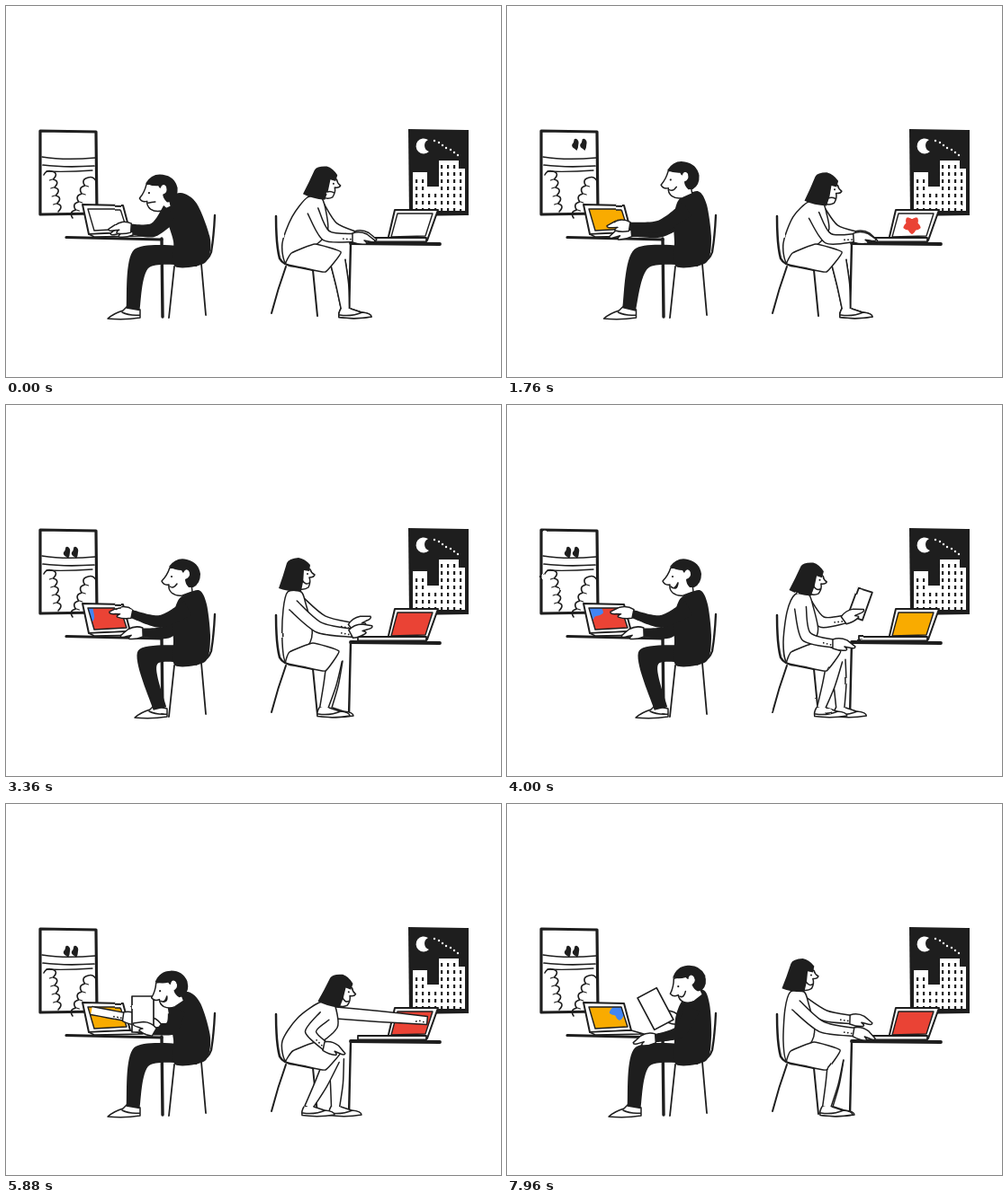
Animation of 550x413 px, one loop 8000 ms. Source, as an HTML page:

```html
<!DOCTYPE html>
<html lang="en">
<head>
<meta charset="utf-8">
<title>Two desks</title>
<style>
html, body { margin: 0; width: 100%; height: 100%; overflow: hidden; background: #fff; }
svg { display: block; width: 100%; height: 100%; }
.l { fill: none; stroke: #1e1e1e; stroke-width: 1.5; stroke-linecap: round; stroke-linejoin: round; }
.w { fill: #fff; stroke: #1e1e1e; stroke-width: 1.5; stroke-linejoin: round; stroke-linecap: round; }
.k { fill: #1e1e1e; }
.p { fill: #fff; }
</style>
</head>
<body>
<svg viewBox="0 0 550 413">
  <defs>
    <filter id="boil" filterUnits="userSpaceOnUse" x="0" y="0" width="550" height="413" color-interpolation-filters="sRGB">
      <feTurbulence id="noise" type="fractalNoise" baseFrequency=".06" numOctaves="1" seed="1"/>
      <feDisplacementMap in="SourceGraphic" scale="1.8" xChannelSelector="R" yChannelSelector="G"/>
    </filter>
    <clipPath id="pane"><path d="M39 140H100V231H39Z"/></clipPath>
    <clipPath id="clipL"><path d="M91 226L127 226L134 248L98 250Z"/></clipPath>
    <clipPath id="clipR"><path d="M435 231L474 231L466 256L428 257Z"/></clipPath>
  </defs>
  <g id="stage" filter="url(#boil)"></g>
</svg>
<script>
const LOOP = 8000;
const YELLOW = '#f9ab00', BLUE = '#4285f4', RED = '#ea4335';
const stage = document.getElementById('stage');
const noise = document.getElementById('noise');

function el(tag, attrs, parent = stage) {
  const e = document.createElementNS('http://www.w3.org/2000/svg', tag);
  for (const k in attrs) e.setAttribute(k, attrs[k]);
  return parent.appendChild(e);
}
function path(cls, d = '', width = 0, parent = stage) {
  const e = el('path', { class: cls, d }, parent);
  if (width) e.style.strokeWidth = width;
  return e;
}
const line = (d, width, parent) => path('l', d, width, parent);
const dot = (cx, cy, r, cls, parent) => el('circle', { cx, cy, r, class: cls }, parent);
const group = (parent = stage, attrs = {}) => el('g', attrs, parent);
const draw = (e, d) => e.setAttribute('d', d);
const show = (e, on) => e.setAttribute('display', on ? 'inline' : 'none');
const place = (e, x, y, r = 0, flip = 1) => e.setAttribute('transform', `translate(${x} ${y}) rotate(${r}) scale(${flip} 1)`);

const ramp = (t, a, b) => Math.max(0, Math.min(1, (t - a) / (b - a)));
const ease = k => k * k * (3 - 2 * k);
const lerp = (a, b, k) => a + (b - a) * k;
const mid = (a, b) => [(a[0] + b[0]) / 2, (a[1] + b[1]) / 2];

// Smooth curve through points.
function curve(p, closed = true, tension = 0.14) {
  const n = p.length;
  const at = i => p[closed ? (i + n) % n : Math.max(0, Math.min(n - 1, i))];
  let d = 'M' + at(0);
  for (let i = 0; i < (closed ? n : n - 1); i++) {
    const [a, b, c, e] = [at(i - 1), at(i), at(i + 1), at(i + 2)];
    d += `C${b.map((v, m) => v + (c[m] - a[m]) * tension)} ${c.map((v, m) => v - (e[m] - b[m]) * tension)} ${c}`;
  }
  return d;
}

// Outline of a tapering limb, left open at its root.
function limb(joints, widths) {
  const left = [], right = [];
  joints.forEach(([x, y], i) => {
    const a = joints[Math.max(0, i - 1)], b = joints[Math.min(joints.length - 1, i + 1)];
    const dx = b[0] - a[0], dy = b[1] - a[1], k = widths[i] / 2 / (Math.hypot(dx, dy) || 1);
    left.push([x - dy * k, y + dx * k]);
    right.unshift([x + dy * k, y - dx * k]);
  });
  return curve(left, false) + curve(right, false).replace('M', 'L');
}

// The middle joint sits off the centre by the bend.
function bent(a, b, bend) {
  const m = mid(a, b), dx = b[0] - a[0], dy = b[1] - a[1], k = bend / Math.hypot(dx, dy);
  return [a, [m[0] - dy * k, m[1] + dx * k], b];
}

function poseAt(keys, t) {
  const i = keys.findLastIndex(p => t >= p.from), a = keys[i], b = keys[i + 1];
  if (!b || t <= a.until) return a;
  const k = ease(ramp(t, a.until, b.from)), out = {};
  for (const key in a) if (Array.isArray(a[key])) out[key] = a[key].map((v, j) => lerp(v, b[key][j], k));
  return out;
}
// Each pose takes over what it does not change from the one before.
const chain = poses => poses.reduce((all, p) => [...all, { ...all.at(-1), ...p }], []);

// Left window
path('w', 'M38 139L100 140L101 231L38 232Z', 3.2);
line('M40 168Q65 172 99 169', 1.5);
line('M41 177Q65 180 98 178', 1.7);
line('M45 184Q68 185 96 183', 1.3);
function bush(x, y, dir, drift) {
  const bump = `q${dir * 8} 2 ${dir * drift} 9`;
  line(`M${x - dir * 9} ${y + 4}q${dir * 3} -6 ${dir * 9} -4${bump.repeat(5)}`, 1.6);
  for (let i = 1; i < 5; i++) line(`M${x + dir * (drift * i - 4)} ${y + 9 * i + 1}l${dir * 3} -1`, 1.2);
}
bush(51, 184, 1, 1.4);
bush(91, 191, -1, 3.4);
const birds = group(group(stage, { 'clip-path': 'url(#pane)' }));
for (const x of [68, 77])
  path('k', `M${x - 2} 160q0 -3 3 -2q3 2 2 6q0 4 -2 7l-2 -2q-4 -2 -3 -5q2 -2 2 -4z`, 0, birds);

// Right window
path('k', 'M447 137L514 138L514 233L448 234Z');
path('p', 'M469 149A8.500 8.500 0 1 0 470 162A7 7 0 0 1 469 149Z');
for (let i = 0; i < 7; i++) dot(476 + i * 13 % 30, 150 + i * 8 % 19, 1.2, 'p');
path('p', 'M452 185H468V201H481V172H503V181H510V228H452Z');
for (let x = 455; x < 509; x += 7) {
  const roof = x < 467 ? 185 : x < 481 ? 201 : x < 502 ? 172 : 181;
  for (let y = 177; y < 226; y += 8)
    if (y > roof + 2) el('rect', { x, y, width: 2.2, height: 4, class: 'k' });
}

// Chairs, desks and laptops
line('M232 233Q231 256 228 274Q225 283 217 285', 2.3);
line('M187 290L181 347M217 287L222 344', 1.8);
line('M300 234Q300 266 304 281Q308 289 322 290L342 294', 2.5);
line('M311 290Q302 315 295 342M341 294L346 345', 2);
line('M67 257.500L173 260', 3.2);
line('M173 259L174 346', 3.4);
line('M383 264L482 265', 3.8);
line('M383 264L381 346', 2.4);
path('w', 'M85 221L130 222L138 252L92 254Z', 2);
path('w', 'M92 254L138 252L152 256L98 257Z');
path('w', 'M432 227L480 227L468 261L424 261Z', 2);
path('w', 'M391 258L467 258L467 262.500L391 262.500Z', 1.8);

// Colours flood each screen as a growing wavy blob.
function blob(x, y, r) {
  const points = Array.from({ length: 20 }, (_, i) => {
    const a = i * Math.PI / 10, R = r * (1 + 0.18 * Math.sin(5 * a));
    return [x + R * Math.cos(a), y + R * Math.sin(a)];
  });
  return curve(points);
}
function screen(clip, cues) {
  const g = group(stage, { 'clip-path': `url(#${clip})` });
  const blobs = cues.map(([start, fill, x, y]) => ({ start, x, y, e: el('path', { fill }, g) }));
  line(document.querySelector(`#${clip} path`).getAttribute('d'), 1.4);
  return t => blobs.forEach(b => draw(b.e, blob(b.x, b.y, 70 * ramp(t, b.start, b.start + 500))));
}
const screens = [
  screen('clipL', [[1500, YELLOW, 112, 238], [2390, BLUE, 98, 250], [3030, RED, 134, 250],
    [3900, BLUE, 91, 226], [4900, YELLOW, 112, 240], [7890, BLUE, 125, 229]]),
  screen('clipR', [[1700, RED, 450, 244], [3650, YELLOW, 435, 232], [4440, BLUE, 466, 247], [5000, RED, 450, 244]])
];

// Shared body parts
const HAND = 'M2 -5Q-6 -8 -14 -4L-23 3Q-23 6 -16 4L-11 3Q-15 6 -13 7Q-6 8 2 5Z';
const SHOE = 'M0 11Q7 5 17 2L21 -2L36 1L36 10Q18 13 0 11ZM16 4Q24 8 36 7';
const ARM = [18, 14, 9], SLEEVE = [13, 12, 9];
const PANTS = [22, 26, 15], CALF = [17, 14, 9];

function smile(e, m, dir) {
  const open = m > 1.2 ? `Q${dir * 8} ${11 + 3 * m} ${dir * 15} 10Z` : '';
  draw(e, `M${dir * 15} 10Q${dir * 11} ${10 + 3 * m} ${dir * 7} ${9 - 2 * m}${open}`);
}
function cuff(parent) {
  const g = group(parent);
  for (let x = -4; x > -13; x -= 4) dot(x, 2, 0.9, 'k', g);
  return ([, a, b]) => place(g, ...b, Math.atan2(b[1] - a[1], b[0] - a[0]) * 180 / Math.PI);
}

// Man
const manFarArm = path('k'), manFarHand = path('w', HAND), manShoe = path('w', SHOE);
const manLeg = path('k'), manTorso = path('k');
const visit = group();
const visitArm = path('w', '', 0, visit), visitCuff = cuff(visit);
const manPaper = path('w', 'M-12 -20L12 -20L12 20L-12 20Z', 1.7);
const visitHand = path('w', HAND, 0, visit);
const manHead = group();
path('w', 'M-15 -11C-17 -5 -19 -1 -24 4Q-22 9 -16 8Q-17 13 -13 17Q-8 21 -1 20L10 16L7 -10Z', 0, manHead);
path('k', 'M-16 -12Q-8 -23 4 -20Q17 -17 19 -4Q19 7 11 11L6 11Q2 7 2 2Q8 0 7 -6Q4 -11 1 -7Q0 -3 -2 -8Q-9 -8 -16 -12Z', 0, manHead);
dot(-13, -1, 1.1, 'k', manHead);
const manMouth = path('w', '', 0, manHead);
const manArm = path('k'), manHand = path('w', HAND);

// head: x, y, turn; hands: x, y, turn, elbow bend; paper: x, y, turn
const manPoses = chain([
  { from: 0, until: 700, head: [172, 208, -5], neck: [184, 212], mood: [-0.2],
    near: [137, 247, 4, -12], far: [139, 250, 0, -8], toe: [113], paper: [152, 234, 0] },
  { from: 950, until: 1350, head: [171, 212, -42], mood: [-0.6] },
  { from: 1850, until: 2600, head: [197, 192, 0], neck: [204, 210], mood: [1],
    near: [134, 245, 4, -10], far: [136, 252, 0, -8], toe: [107] },
  { from: 3050, until: 3700, near: [138, 232, 12, -12], far: [150, 253, -2, -10], toe: [143] },
  { from: 4100, until: 4850, mood: [1.7] },
  { from: 5450, until: 6200, head: [184, 206, -14], neck: [192, 213], mood: [1.3],
    near: [163, 253, 30, -12], far: [168, 248, 35, -8], toe: [113] },
  { from: 6900, until: LOOP, head: [203, 200, -18], neck: [208, 211], mood: [1.2],
    near: [163, 261, -4, -12], far: [188, 240, 28, -4], paper: [165, 228, -28] }
]);

function drawMan(t) {
  const p = poseAt(manPoses, t), tap = t < 2700 ? 5 * Math.sin(t / 45) : 0;
  const [nx, ny] = p.neck, lean = 204 - nx, toe = p.toe[0];
  place(manHead, ...p.head);
  smile(manMouth, p.mood[0], -1);
  draw(manTorso, curve([[nx - 11, ny + 5], [nx + 10, ny - 4], [nx + 19 + lean * 0.45, ny + 12 - lean * 0.2],
    [227, 260], [221, 286], [188, 290], [186, 262], [186 - lean * 0.4, 236]]));
  const ankle = [toe + 28, 338], knee = [126 + toe * 0.22, 281];
  draw(manLeg, limb([[212, 279], knee, ankle], PANTS));
  place(manShoe, toe, 337);
  const root = [nx - 2, ny + 16];
  draw(manArm, limb(bent(root, p.near.slice(0, 2), p.near[3]), ARM));
  draw(manFarArm, limb(bent([nx - 4, ny + 24], p.far.slice(0, 2), p.far[3]), ARM));
  place(manHand, p.near[0], p.near[1], p.near[2] + tap);
  place(manFarHand, p.far[0], p.far[1], p.far[2] - tap);

  const out = ease(ramp(t, 5200, 5600)) * (1 - ease(ramp(t, 6250, 6650)));
  const arm = bent([95, 230], [95.1 + 37 * out, 230 + 7 * out], 0);
  show(visit, out > 0.02);
  draw(visitArm, limb(arm, [9, 9, 9]));
  visitCuff(arm);
  place(visitHand, ...arm[2], 8, -1);
  show(manPaper, t > 5350);
  place(manPaper, ...p.paper);
}

// Woman
const calves = [0, 1].map(() => ({
  leg: path('w'),
  shoe: path('w', 'M0 0Q-3 5 -2 9.500Q16 12 34 9Q34 5 23 4L11 0M-1 7Q12 9 24 4')
}));
const farArm = path('w'), farCuff = cuff();
const paper = path('w', 'M14 -35L30 -30L19 1L3 -5Z', 1.8);
const farHand = path('w', HAND), torso = path('w'), skirt = path('w');
const nearArm = path('w'), nearCuff = cuff(), nearHand = path('w', HAND);
const head = group();
path('w', 'M6 -8L16 -5Q17 -1 21 1Q20 4 15 4Q17 9 14 15Q10 18 4 17Z', 0, head);
path('k', 'M-19 16Q-14 2 -10 -12Q-8 -17 3 -18Q10 -17 16 -10L15 -3L9 -4Q9 8 6 19Q-8 20 -19 16Z', 0, head);
dot(13, 0, 1, 'k', head);
const mouth = line('', 0, head);

const herPoses = chain([
  { from: 0, until: 700, head: [351, 196, 8], neck: [342, 213], mood: [-0.6],
    near: [387, 258, 0, 15], far: [389, 256, 2, 8], ankles: [377, 377] },
  { from: 950, until: 1350, head: [357, 201, 10], neck: [345, 216], near: [387, 258, -12, 15] },
  { from: 1800, until: 2600, head: [351, 203, 6], neck: [342, 218], near: [387, 258, 0, 15] },
  { from: 3000, until: 3650, head: [322, 188, 0], neck: [320, 208], mood: [1],
    near: [385, 254, -28, 10], far: [385, 247, -38, 8], ankles: [357, 353] },
  { from: 4200, until: 4850, head: [340, 195, 12], neck: [330, 212], mood: [0.8],
    near: [355, 271, 12, 20], far: [372, 235, -35, 14], ankles: [376, 347] },
  { from: 5450, until: 6200, head: [368, 207, 10], neck: [355, 221], mood: [1],
    near: [355, 270, 12, 16], far: [468, 241, 0, 0], ankles: [366, 336] },
  { from: 6800, until: LOOP, head: [325, 190, 2], neck: [322, 209],
    near: [387, 254, 6, 10], far: [383, 240, 6, 6], ankles: [357, 355] }
]);

function drawWoman(t) {
  const p = poseAt(herPoses, t), tap = t < 2700 || t > 6800 ? 5 * Math.sin(t / 50) : 0;
  const [nx, ny] = p.neck, lean = nx - 320;
  place(head, ...p.head);
  smile(mouth, p.mood[0], 1);
  draw(torso, curve([[nx - 7, ny], [nx + 8, ny], [nx + 13, ny + 13], [340 + lean * 0.8, 249],
    [338 + lean * 0.4, 264], [329, 273], [311, 286], [307, 264], [308 + lean * 0.45, 228 + lean * 0.3]]));
  draw(skirt, curve([[311, 287], [315 + lean * 0.1, 275], [341 + lean * 0.1, 265], [370 + lean * 0.1, 274], [355, 296], [333, 292]], true, 0.06));
  calves.forEach(({ leg, shoe }, i) => {
    const x = p.ankles[i], knee = [312 + x * 0.15, 284];
    draw(leg, limb(bent(knee, [x, 338], -1), CALF));
    place(shoe, x - 5, 337);
  });
  const near = bent([nx - 1, ny + 15], p.near.slice(0, 2), p.near[3]);
  const far = bent([nx + 6, ny + 11], p.far.slice(0, 2), p.far[3]);
  draw(nearArm, limb(near, SLEEVE));
  draw(farArm, limb(far, SLEEVE));
  nearCuff(near);
  farCuff(far);
  place(nearHand, ...near[2], p.near[2] + tap, -1);
  place(farHand, ...far[2], p.far[2] - tap, -1);
  place(paper, ...far[2]);
  const outside = p.far[0] < 428;
  show(farHand, outside);
  show(paper, outside && t > 3950 && t < 5600);
}

function render(t) {
  noise.setAttribute('seed', 1 + Math.floor(t / 120) % 7);
  screens.forEach(s => s(t));
  const away = 1 - ease(ramp(t, 1500, 1900));
  show(birds, t >= 1500);
  place(birds, 30 * away, -36 * away);
  drawMan(t);
  drawWoman(t);
}

const start = performance.now();
(function tick() {
  render((performance.now() - start) % LOOP);
  requestAnimationFrame(tick);
})();
</script>
</body>
</html>
```
